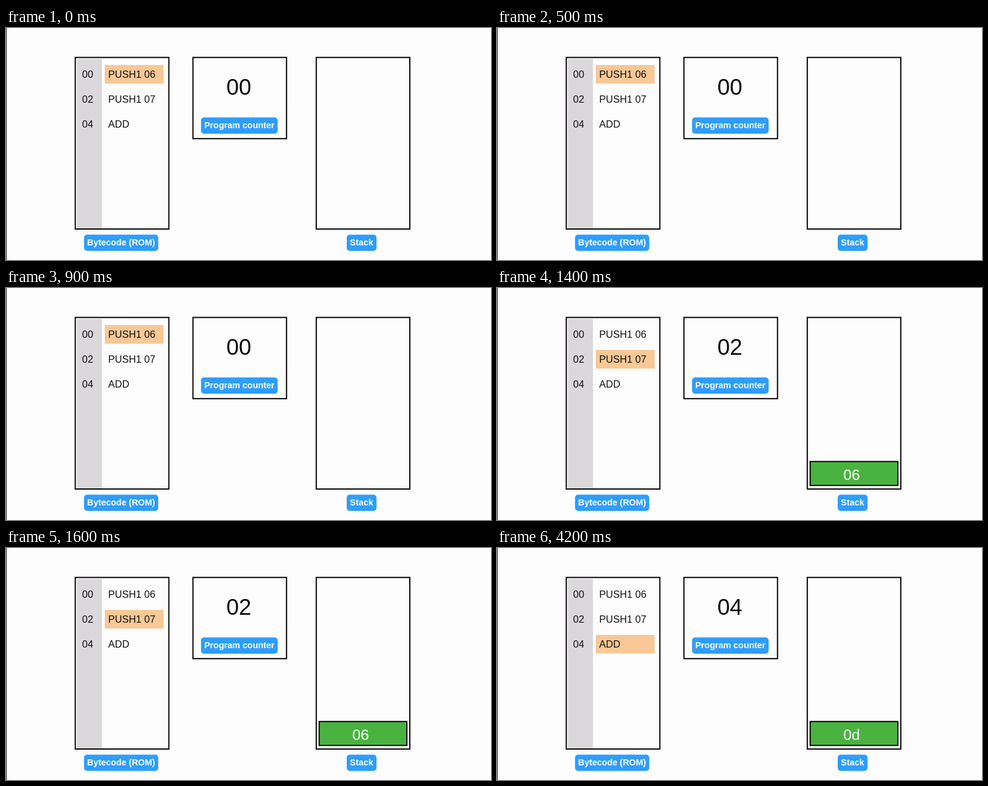
Animation, 800 px wide and 382 px high, one loop 6800 ms. Source, as an HTML page:

```html
<!DOCTYPE html>
<html lang="en">
<head>
<meta charset="utf-8">
<title>Stack machine</title>
<style>
  html, body { margin: 0; width: 100%; height: 100%; overflow: hidden; background: #fefdfe; }
  svg { display: block; width: 100%; height: 100%; font-family: "Liberation Sans", Arial, sans-serif; }
  .panel, .cell { fill: #fefdfe; stroke: #050505; stroke-width: 2; }
  .code { font-size: 16.5px; fill: #111; }
  .tag rect { fill: #2e9dfc; }
  .tag text { font-size: 14.4px; font-weight: bold; fill: #fff; text-anchor: middle; }
  .counter { font-size: 37.1px; fill: #080808; text-anchor: middle; }
  .value { font-size: 24.7px; fill: #080808; text-anchor: middle; }
  .top .cell { fill: #49b340; }
  .top .value { fill: #fff; }

  /* Steps begin at 0, 1400, 2700 and 4200 ms */
  .mark { fill: #f8c896; animation: mark 6.8s step-end infinite; }
  .s1, .s2, .s3, .s4, .s34 { opacity: 0; animation: 6.8s step-end infinite; }
  .s1 { animation-name: s1; }
  .s2 { animation-name: s2; }
  .s3 { animation-name: s3; }
  .s4 { animation-name: s4; }
  .s34 { animation-name: s34; }
  @keyframes mark {
    0% { transform: translateY(0); }
    20.5882% { transform: translateY(41px); }
    39.7059%, 100% { transform: translateY(82px); }
  }
  @keyframes s1 { 0% { opacity: 1; } 20.5882%, 100% { opacity: 0; } }
  @keyframes s2 { 0% { opacity: 0; } 20.5882% { opacity: 1; } 39.7059%, 100% { opacity: 0; } }
  @keyframes s3 { 0% { opacity: 0; } 39.7059% { opacity: 1; } 61.7647%, 100% { opacity: 0; } }
  @keyframes s4 { 0% { opacity: 0; } 61.7647%, 100% { opacity: 1; } }
  @keyframes s34 { 0% { opacity: 0; } 39.7059%, 100% { opacity: 1; } }
</style>
</head>
<body>
<svg viewBox="0 0 800 382">
  <rect width="800" height="382" fill="#fefdfe"/>
  <rect width="1" height="382" fill="#222"/>

  <!-- Bytecode -->
  <rect class="panel" x="114.3" y="48.5" width="154.3" height="282.5"/>
  <rect x="117" y="51" width="41.3" height="279" fill="#dad8da"/>
  <rect class="mark" x="163" y="61" width="97" height="30.7"/>
  <g class="code">
    <text x="125.6" y="82.2">00</text><text x="168.5" y="82.2">PUSH1 06</text>
    <text x="125.6" y="123.3">02</text><text x="168.5" y="123.3">PUSH1 07</text>
    <text x="125.6" y="164.4">04</text><text x="168.5" y="164.4">ADD</text>
  </g>
  <g class="tag">
    <rect x="128.7" y="340.3" width="122.4" height="26.7" rx="5"/>
    <text x="189.8" y="357.7">Bytecode (ROM)</text>
  </g>

  <!-- Program counter -->
  <rect class="panel" x="308.4" y="48.5" width="154.3" height="133.7"/>
  <g class="counter">
    <text class="s1" x="384" y="109.6">00</text>
    <text class="s2" x="384" y="109.6">02</text>
    <text class="s34" x="384" y="109.6">04</text>
  </g>
  <g class="tag">
    <rect x="321.7" y="147.3" width="126.4" height="26.7" rx="5"/>
    <text x="384.9" y="164.7">Program counter</text>
  </g>

  <!-- Stack -->
  <rect class="panel" x="511.8" y="48.5" width="154.3" height="282.5"/>
  <g class="s2 top">
    <rect class="cell" x="516.6" y="285.7" width="144.6" height="39.4"/>
    <text class="value" x="584.9" y="315.6">06</text>
  </g>
  <g class="s3">
    <g class="top">
      <rect class="cell" x="516.6" y="240.6" width="144.6" height="39.4"/>
      <text class="value" x="584.9" y="270.5">07</text>
    </g>
    <rect class="cell" x="516.6" y="285.7" width="144.6" height="39.4"/>
    <text class="value" x="584.9" y="315.6">06</text>
  </g>
  <g class="s4 top">
    <rect class="cell" x="516.6" y="285.7" width="144.6" height="39.4"/>
    <text class="value" x="584.9" y="315.6">0d</text>
  </g>
  <g class="tag">
    <rect x="562" y="340.3" width="49.2" height="26.7" rx="5"/>
    <text x="586.5" y="357.7">Stack</text>
  </g>
</svg>
</body>
</html>
```
